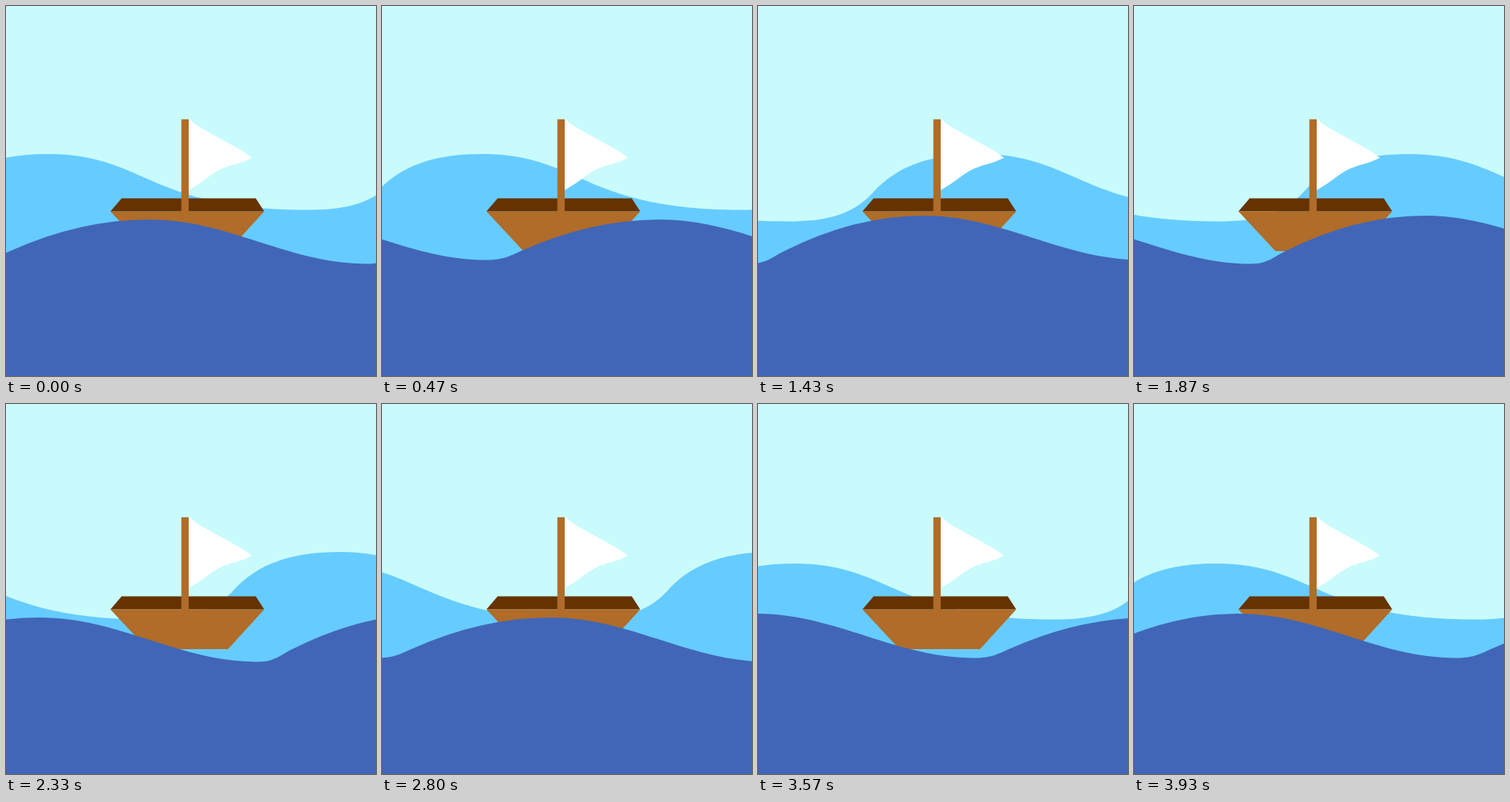
An HTML page for the animation above (3960 ms loop, 480 px wide and 480 px high).

```html
<!DOCTYPE html>
<html lang="en">
<head>
<meta charset="utf-8">
<title>Sailing boat</title>
<style>
  html, body { margin: 0; width: 100%; height: 100%; overflow: hidden; background: #c9fbfc; }
  svg { display: block; width: 100%; height: 100%; }
</style>
</head>
<body>
<svg viewBox="0 0 480 480">
  <rect width="480" height="480" fill="#c9fbfc"/>
  <path id="back" fill="#66ccff"/>
  <g id="boat">
    <path fill="#fff" d="M237 146Q243 152 251 157L294 181Q308 188 319 197Q309 202 298 205Q280 209 265 220Q251 231 237 239Z"/>
    <path fill="#663300" d="M150 249.5H324L335 266.5H135.5Z"/>
    <path fill="#b06c28" d="M135.5 266.5H335L288 318H183.5Z"/>
    <path fill="#b06c28" d="M227.5 147H237V267H227.5Z"/>
  </g>
  <path id="front" fill="#4166b7"/>
</svg>
<script>
  const LOOP = 3960;
  const FRAMES = 119;
  const FRAME = 100 / 3;

  // Each swell is drawn around its crest (x, y): rise, fall to the trough, foot of the next.
  const backSwell = (x, y) =>
    `L${x - 138} ${y + 51}` +
    `C${x - 105} ${y + 14} ${x - 60} ${y} ${x} ${y}` +
    `C${x + 127} ${y} ${x + 131} ${y + 72.5} ${x + 337} ${y + 72.5}` +
    `C${x + 385} ${y + 72.5} ${x + 420} ${y + 65} ${x + 447} ${y + 36}`;

  const frontSwell = (x, y) =>
    `L${x - 181} 318` +
    `Q${x - 90} ${y} ${x} ${y}` +
    `C${x + 103} ${y} ${x + 180} ${y + 57.5} ${x + 283} ${y + 57.5}` +
    `C${x + 306} ${y + 57.5} ${x + 315.5} 323 ${x + 327.5} 318`;

  // Swells are laid out from right to left; every second one has another height.
  const waves = [
    { id: "back", swell: backSwell, crest: 54, spacing: 585, heights: [192, 207], count: 2, speed: 5.4 },
    { id: "front", swell: frontSwell, crest: 186, spacing: 508.5, heights: [277, 272], count: 4, speed: 12.5 }
  ];

  for (const wave of waves) {
    const { swell, crest, spacing, heights, count } = wave;
    let outline = "";
    for (let i = count - 1; i >= 0; i--) {
      outline += swell(crest - i * spacing, heights[i % 2]);
    }
    wave.node = document.getElementById(wave.id);
    wave.node.setAttribute("d", `M${crest - count * spacing} 500${outline}V500Z`);
  }

  function draw(time) {
    const frame = Math.floor((time % LOOP + 3.5) / FRAME) % FRAMES;
    for (const { node, speed } of waves) {
      node.setAttribute("transform", `translate(${frame * speed} 0)`);
    }
  }

  const start = performance.now();
  function loop() {
    draw(performance.now() - start);
    requestAnimationFrame(loop);
  }
  loop();
</script>
</body>
</html>
```
